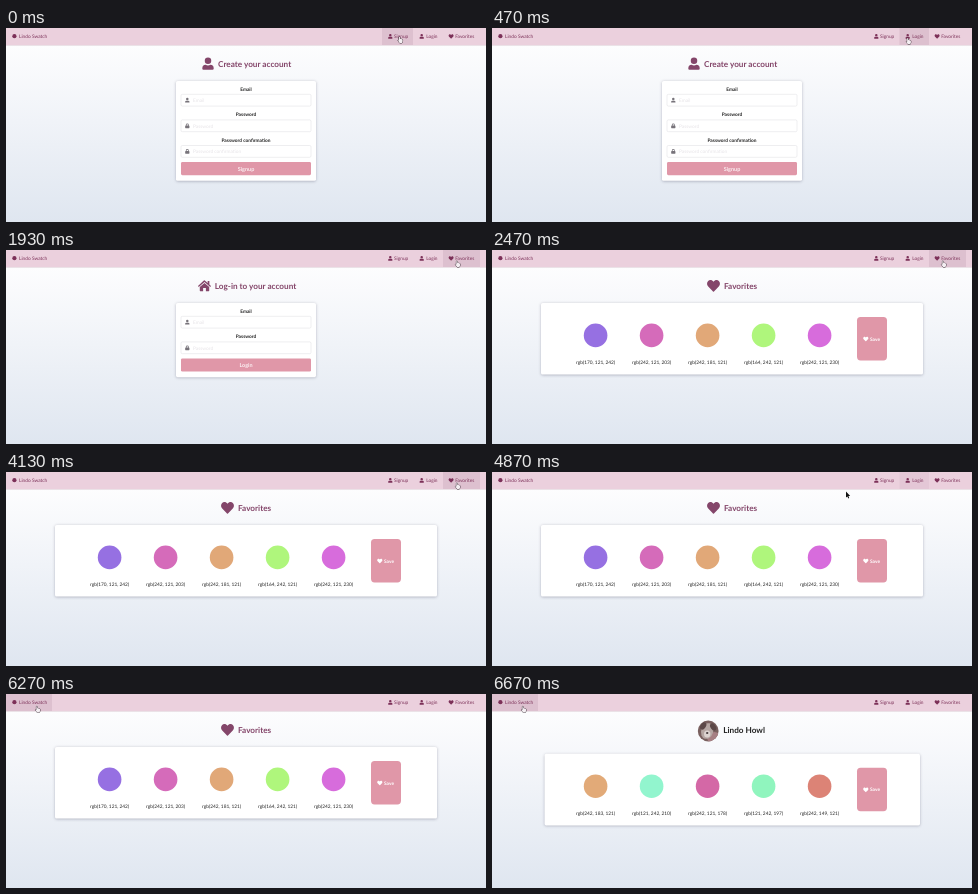
Recreate the animation shown at these times as an HTML page with a canvas. Size 480 px wide and 194 px high, loop 8000 ms.

```html
<!DOCTYPE html>
<html lang="en">
<head>
<meta charset="utf-8">
<title>Palette app</title>
<style>
html, body { margin: 0; width: 100%; height: 100%; overflow: hidden; background: #eef1f6; }
canvas { display: block; width: 480px; height: 194px; }
</style>
</head>
<body>
<canvas id="stage"></canvas>
<script>
const W = 480, H = 194, LOOP = 8000, TICK = 1000 / 15;
const PLUM = '#84466a', ROSE = '#e097a8', INK = '#222';
const canvas = document.getElementById('stage');
const ctx = canvas.getContext('2d');
const ratio = window.devicePixelRatio || 1;
canvas.width = W * ratio;
canvas.height = H * ratio;

// Icons live in a 16 x 16 box.
const ICONS = {
  user: 'M8 0.5A4 4 0 0 1 8 8.5A4 4 0 0 1 8 0.5ZM5 9.4Q8 10.8 11 9.4Q15 9.6 15 13.6V14.2Q15 15.5 13.6 15.5H2.4Q1 15.5 1 14.2V13.6Q1 9.6 5 9.4Z',
  heart: 'M8 3.2C10 0.4 13.2 0.7 14.8 2.5C16.5 4.5 16.2 7.2 14.5 9L8.6 15Q8 15.6 7.4 15L1.5 9C-0.2 7.2-0.5 4.5 1.2 2.5C2.8 0.7 6 0.4 8 3.2Z',
  lock: 'M3.4 7V5A4.6 4.6 0 0 1 12.6 5V7H13.3Q14.8 7 14.8 8.5V14.2Q14.8 15.7 13.3 15.7H2.7Q1.2 15.7 1.2 14.2V8.5Q1.2 7 2.7 7ZM5.7 7H10.3V5A2.3 2.3 0 0 0 5.7 5Z',
  home: 'M8 1.4L11.9 4.8V2.2H14V6.6L16 8.4L15.1 9.5L8 3.4L0.9 9.5L0 8.4L7.2 1.7ZM8 4.6L13.8 9.6V14.3Q13.8 14.9 13.2 14.9H9.7V10.7H6.3V14.9H2.8Q2.2 14.9 2.2 14.3V9.6Z'
};
for (const name in ICONS) ICONS[name] = new Path2D(ICONS[name]);

const ARROW = new Path2D('M0 0V6L1.4 4.8L2.3 6.8L3.2 6.4L2.4 4.5H4.2Z');
const HAND = new Path2D('M0.9 0.5Q1.5-0.2 1.9 0.6V2.3Q2.5 2 2.8 2.5Q3.4 2.2 3.7 2.8Q4.6 2.6 4.6 3.6Q4.7 5 3.9 6.5H1.6Q1 5.4-0.1 4.1Q-0.1 3.3 0.9 4Z');

const NAV = [
  { x: 0, end: 46, label: 'Lindo Swatch', textX: 13 },
  { x: 376, end: 407, label: 'Signup', textX: 388, icon: 'user', iconX: 381.8 },
  { x: 407.5, end: 437, label: 'Login', textX: 420.2, icon: 'user', iconX: 413.2 },
  { x: 437, end: 474, label: 'Favorites', textX: 449.2, icon: 'heart', iconX: 442.6 }
];

// Cursor path: tick, x, y
const PATH = [
  [0, 392, 8.5], [1, 393.5, 8.6], [4, 407, 9.6], [7, 414.3, 9.8],
  [22, 414.3, 9.8], [24, 415, 9.8], [26, 429, 10], [29, 449.5, 10.6],
  [69, 449.5, 10.6], [70, 444, 12], [71, 425, 14], [72, 412, 16], [73, 354, 19.6],
  [75, 222, 32], [76, 196, 33.8], [80, 196, 33.8], [83, 190, 36],
  [88, 108, 27], [91, 48, 14], [93, 29.5, 12], [120, 29.5, 12]
];

const FAVORITES = [
  ['170, 121, 242', '#9670e2'], ['242, 121, 203', '#d56bba'], ['242, 181, 121', '#e1a878'],
  ['164, 242, 121', '#aff67c'], ['242, 121, 230', '#d76cdc']
];
const PROFILE = [
  ['242, 183, 121', '#e2aa78'], ['121, 242, 210', '#92f5ce'], ['242, 121, 178', '#d468a6'],
  ['121, 242, 197', '#90f5be'], ['242, 149, 121', '#dc8376']
];

function cursorAt(tick) {
  const i = Math.max(1, PATH.findIndex(p => p[0] >= tick));
  const [t0, x0, y0] = PATH[i - 1], [t1, x1, y1] = PATH[i];
  const k = (tick - t0) / (t1 - t0);
  return { x: x0 + (x1 - x0) * k, y: y0 + (y1 - y0) * k };
}

function isOver(item, tick) {
  const p = cursorAt(Math.max(0, tick));
  return p.y < 17 && p.x >= item.x && p.x < item.end;
}

function text(str, x, y, size, color, weight = 400, align = 'left') {
  ctx.font = `${weight} ${size}px Lato, sans-serif`;
  ctx.textAlign = align;
  ctx.fillStyle = color;
  ctx.fillText(str, x, y);
}

function icon(name, x, y, size, color) {
  ctx.save();
  ctx.translate(x, y);
  ctx.scale(size / 16, size / 16);
  ctx.fillStyle = color;
  ctx.fill(ICONS[name], 'evenodd');
  ctx.restore();
}

function box(x, y, w, h, r, fill, stroke) {
  ctx.beginPath();
  ctx.roundRect(x, y, w, h, r);
  ctx.fillStyle = fill;
  ctx.fill();
  if (stroke) {
    ctx.strokeStyle = stroke;
    ctx.lineWidth = 0.5;
    ctx.stroke();
  }
}

function disc(x, y, r, fill) {
  ctx.beginPath();
  ctx.arc(x, y, r, 0, Math.PI * 2);
  ctx.fillStyle = fill;
  ctx.fill();
}

function card(x, y, w, h) {
  ctx.save();
  ctx.shadowColor = 'rgba(60, 60, 90, 0.36)';
  ctx.shadowBlur = 3 * ratio;
  ctx.shadowOffsetY = 0.6 * ratio;
  box(x, y, w, h, 1.6, '#fff');
  ctx.restore();
}

function backdrop() {
  const g = ctx.createLinearGradient(0, 17, 0, H);
  g.addColorStop(0, '#fdfdfe');
  g.addColorStop(1, '#dfe6f0');
  ctx.fillStyle = g;
  ctx.fillRect(0, 0, W, H);
}

function navbar(tick) {
  ctx.fillStyle = '#ebd0dd';
  ctx.fillRect(0, 0, W, 17);
  ctx.fillStyle = 'rgba(150, 100, 130, 0.3)';
  ctx.fillRect(0, 17, W, 0.6);
  for (const item of NAV) {
    const level = (isOver(item, tick) + isOver(item, tick - 1)) / 2;
    ctx.fillStyle = `rgba(100, 50, 80, ${0.1 * level})`;
    ctx.fillRect(item.x, 0, item.end - item.x, 17);
    if (item.icon) icon(item.icon, item.iconX, 5.9, 5, '#7c3058');
    else disc(8.4, 8.2, 2.1, '#7c3058');
    text(item.label, item.textX, 10, 4.8, '#7c3058');
  }
}

function field(label, hint, glyph, y) {
  text(label, 240, y - 3.6, 4.8, INK, 700, 'center');
  box(175, y, 130, 11.8, 1.4, '#fff', '#dcdce0');
  icon(glyph, 178.8, y + 3.4, 5, '#77737a');
  text(hint, 187, y + 7.8, 4.8, '#e6e3e7');
}

function form(title, glyph, glyphX, titleX, fields, action) {
  const buttonY = 66.3 + 25.6 * (fields.length - 1) + 16.5;
  icon(glyph, glyphX, 29.2, 13, PLUM);
  text(title, titleX, 39.2, 8.2, PLUM, 700);
  card(170, 53, 140, buttonY + 18.8 - 53);
  fields.forEach((f, i) => field(...f, 66.3 + 25.6 * i));
  box(175, buttonY, 130, 13.2, 1.4, ROSE);
  text(action, 240, buttonY + 8.5, 5.49, '#fbeff2', 700, 'center');
}

function palette(colors, x, y, w) {
  card(x, y, w, 71.6);
  colors.forEach(([rgb, fill], i) => {
    const cx = 103.6 + 56 * i;
    disc(cx, y + 32.4, 11.8, fill);
    text(`rgb(${rgb})`, cx, y + 61.2, 4.8, INK, 400, 'center');
  });
  box(365, y + 14, 30, 43.4, 3.6, ROSE);
  icon('heart', 371.2, y + 33.4, 5.2, '#fff');
  text('Save', 378, y + 37.6, 4.8, '#fff', 700);
}

function blob(x, y, rx, ry, turn, fill) {
  ctx.beginPath();
  ctx.ellipse(x, y, rx, ry, turn, 0, Math.PI * 2);
  ctx.fillStyle = fill;
  ctx.fill();
}

function portrait(x, y) {
  ctx.save();
  ctx.beginPath();
  ctx.arc(x, y, 10.4, 0, Math.PI * 2);
  ctx.clip();
  ctx.fillStyle = '#79605f';
  ctx.fillRect(x - 11, y - 11, 22, 22);
  blob(x + 6, y + 7, 7, 6, 0, '#a67f83');
  blob(x - 1, y, 6, 8, 0.3, '#b5a6a3');
  blob(x - 5, y - 5, 2.6, 4, 0.6, '#5c4848');
  blob(x + 5, y - 4, 2.6, 4, -0.6, '#5c4848');
  blob(x - 1, y + 3, 3.2, 3.6, 0, '#dcd3d0');
  blob(x - 1, y + 2, 1.2, 0.9, 0, '#453a3c');
  ctx.restore();
}

const EMAIL = ['Email', 'Email', 'user'];
const PASSWORD = ['Password', 'Password', 'lock'];
const CONFIRM = ['Password confirmation', 'Password confirmation', 'lock'];

function page(tick) {
  if (tick < 12) {
    form('Create your account', 'user', 195.5, 212, [EMAIL, PASSWORD, CONFIRM], 'Signup');
  } else if (tick < 37) {
    form('Log-in to your account', 'home', 192, 208.8, [EMAIL, PASSWORD], 'Login');
  } else if (tick < 100) {
    icon('heart', 215, 29.2, 13, PLUM);
    text('Favorites', 232, 39.2, 8.2, PLUM, 700);
    palette(FAVORITES, 49, 53, 382);
  } else {
    portrait(216.2, 37);
    text('Lindo Howl', 231.2, 38.6, 8.2, INK, 700);
    palette(PROFILE, 52.6, 59.8, 375.4);
  }
}

function pointer(tick) {
  const p = cursorAt(tick);
  const hand = NAV.some(item => isOver(item, tick));
  const shape = hand ? HAND : ARROW;
  ctx.save();
  ctx.translate(p.x, p.y);
  ctx.lineJoin = 'round';
  ctx.lineWidth = hand ? 0.8 : 0.9;
  ctx.strokeStyle = hand ? '#2c2329' : '#fff';
  ctx.stroke(shape);
  ctx.fillStyle = hand ? '#f4eef2' : '#111';
  ctx.fill(shape);
  ctx.restore();
}

function draw(now) {
  const tick = Math.floor((now % LOOP + 5) / TICK) % 120;
  ctx.setTransform(ratio, 0, 0, ratio, 0, 0);
  ctx.textRendering = 'geometricPrecision';
  backdrop();
  navbar(tick);
  page(tick);
  pointer(tick);
}

const start = performance.now();
function loop() {
  draw(performance.now() - start);
  requestAnimationFrame(loop);
}
loop();
</script>
</body>
</html>
```
